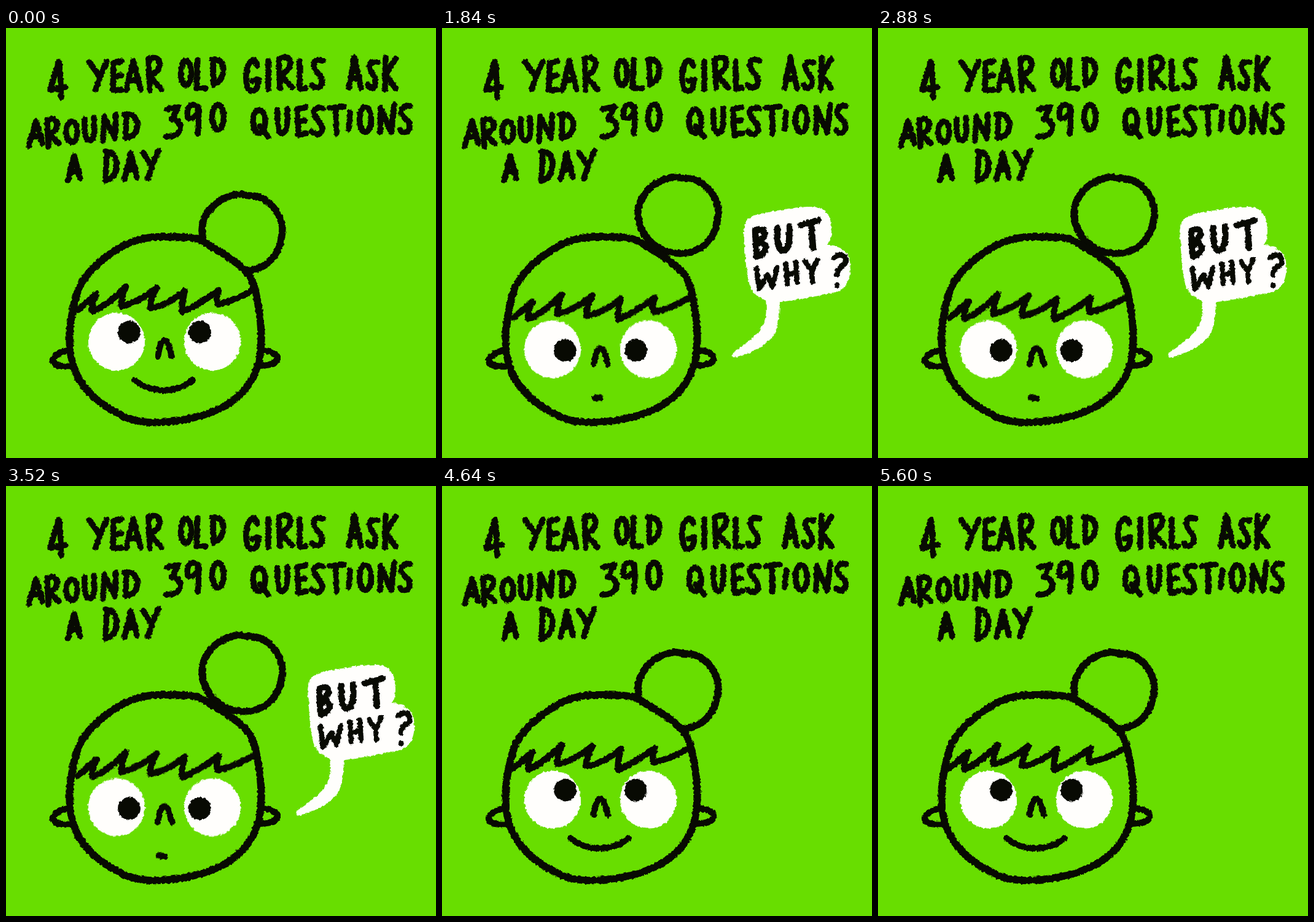
Recreate the animation shown at these times as an HTML page without scripts. Size 700 by 700 pixels, loop 5.68 s.

```html
<!DOCTYPE html>
<html lang="en">
<head>
<meta charset="utf-8">
<title>390 questions a day</title>
<style>
  html, body { margin: 0; width: 100%; height: 100%; overflow: hidden; background: #68de00; }
  svg { display: block; width: 100%; height: 100%; }
  .ink { fill: none; stroke: #080a03; stroke-linecap: round; stroke-linejoin: round; }
  .paper { fill: #fffefc; }
  .dot { fill: #080a03; }
  .skin { fill: #68de00; }

  .face, .bun, .pupils, .smile, .pout, .grow, .pop, .words, .tail {
    animation: 5680ms ease-in-out infinite;
  }
  .face { animation-name: face; }
  .bun { animation-name: bun; }
  .pupils { animation-name: pupils; }
  .smile { animation-name: smile; animation-timing-function: step-end; }
  .pout { animation-name: pout; animation-timing-function: step-end; }
  .grow { animation-name: grow; transform-origin: 477px 529.5px; }
  .pop { animation-name: pop; transform-origin: 577px 366px; }
  .words { animation-name: words; transform-origin: 583px 368px; }
  .tail { animation-name: tail; transform-origin: 535px 442px; }

  @keyframes face {
    0%, 10%, 78.87%, 100% { transform: none; }
    15.5%, 71.13% { transform: translateY(12.5px); }
  }
  @keyframes bun {
    0%, 11.27%, 79.5%, 100% { transform: translateY(28px); }
    16.5%, 73.3% { transform: none; }
  }
  @keyframes pupils {
    0%, 11.27%, 73.24%, 100% { transform: none; }
    15.5%, 70.42% { transform: translateY(17.5px); }
  }
  @keyframes smile {
    0%, 71.83% { opacity: 1; }
    12.68% { opacity: 0; }
  }
  @keyframes pout {
    0%, 71.83% { opacity: 0; }
    12.68% { opacity: 1; }
  }
  @keyframes grow {
    0%, 15.49% { transform: scale(0); animation-timing-function: linear; }
    16.9% { transform: scale(.16); }
    22.54% { transform: scale(1.06); }
    26.76%, 77.4% { transform: none; }
    77.46%, 100% { transform: scale(0); }
  }
  @keyframes pop {
    0%, 69.01% { transform: none; }
    73.24% { transform: scale(1.08); }
    77.46%, 100% { transform: scale(0); }
  }
  @keyframes words {
    0%, 69.01% { transform: none; }
    73.24%, 100% { transform: scale(1.065); }
  }
  @keyframes tail {
    0%, 69.01% { transform: none; }
    73.24% { transform: scale(.14); }
    74.65%, 100% { transform: scale(0); }
  }
</style>
</head>
<body>
<svg viewBox="0 0 700 700" role="img" aria-label="4 year old girls ask around 390 questions a day. But why?">
  <!-- Rough, boiling brush edge; opaque noise keeps the displacement centred -->
  <filter id="brush" filterUnits="userSpaceOnUse" x="0" y="0" width="700" height="700" color-interpolation-filters="sRGB">
    <feTurbulence type="fractalNoise" baseFrequency=".22" numOctaves="2" seed="1">
      <animate attributeName="seed" values="1;2;3;4" dur="320ms" calcMode="discrete" repeatCount="indefinite"/>
    </feTurbulence>
    <feColorMatrix values="1 0 0 0 0  0 1 0 0 0  0 0 1 0 0  0 0 0 0 1" result="noise"/>
    <feDisplacementMap in="SourceGraphic" in2="noise" scale="5" xChannelSelector="R" yChannelSelector="G"/>
  </filter>

  <rect class="skin" width="700" height="700"/>

  <g filter="url(#brush)">
    <g class="ink" stroke-width="9.5">
      <!-- 4 YEAR OLD -->
      <path d="M86 55L72 101L97 96M86 55C90 75 88 95 90 113"/>
      <path d="M135 55L151 77M164 55Q152 80 146 100M188 54L175 57L174 101L188 101M175 79L187 77"/>
      <path d="M196 101L207 53L219 100M200 86L215 84M234 101L232 50Q248 45 250 57Q250 72 234 78L253 100"/>
      <ellipse cx="293" cy="73" rx="8.5" ry="20"/>
      <path d="M312 52L310 98L325 98M337 51L338 92Q354 85 354 66Q352 50 335 51"/>
      <!-- GIRLS ASK -->
      <path d="M409 61Q406 50 399 54C388 62 388 100 399 103Q410 102 411 84L401 86M427 54V100"/>
      <path d="M446 98L444 51Q460 43 463 55Q462 70 447 76L466 97M478 54V99L488 98"/>
      <path d="M517 53Q503 48 501 60Q503 70 511 77Q518 90 510 96Q502 99 498 93"/>
      <path d="M558 98L567 48L578 98M561 83L575 81"/>
      <path d="M605 56Q592 53 591 63Q595 73 601 81Q605 93 596 98Q590 97 589 92M618 48L617 100M634 50L618 76L634 98"/>
      <!-- AROUND 390 -->
      <path d="M37 192L49 151L59 188M42 178L56 175M69 193L67 150Q82 145 84 157Q83 168 70 173L86 188"/>
      <ellipse cx="107" cy="169" rx="9" ry="17"/>
      <path d="M128 148C127 175 130 184 138 183C146 180 144 160 143 146M158 184L160 144L177 179L179 141"/>
      <path d="M196 141L195 179Q214 175 214 156Q210 138 192 141"/>
      <path d="M262 132L281 128L270 148Q285 150 284 164Q280 177 261 177"/>
      <path d="M313 132Q308 122 300 126Q293 134 296 146Q304 150 313 138V128Q315 155 312 172"/>
      <ellipse cx="345" cy="145" rx="9.5" ry="20.5"/>
      <!-- QUESTIONS -->
      <ellipse cx="412" cy="152" rx="10" ry="19"/>
      <path d="M413 160L427 177M442 134C441 160 444 174 451 171C459 166 458 150 458 131"/>
      <path d="M488 129L474 132L476 174L489 171M475 152L487 150"/>
      <path d="M516 131Q502 127 501 139Q505 149 512 155Q518 168 509 173Q501 173 498 168"/>
      <path d="M527 130L550 128M537 130L538 172M560 137L558 165"/>
      <ellipse cx="585" cy="149" rx="9.5" ry="20.5"/>
      <path d="M609 170L610 130L627 170L632 125M658 127Q644 124 643 138Q648 147 655 152Q660 165 652 170Q645 172 642 166"/>
      <!-- A DAY -->
      <path d="M101 248L111 208L121 245M105 235L119 232M164 202L162 249Q181 243 180 219Q176 200 162 201"/>
      <path d="M193 246L203 204L213 243M196 231L211 229M223 203L234 220M248 200Q238 222 231 245"/>
    </g>

    <path class="ink bun" stroke-width="11.5" d="M319 300C320 278 338 250 375 243C385 241 390 246 400 245C425 246 448 272 450 298C449 335 430 366 388 367C350 366 320 340 319 300Z"/>
    <path class="ink" stroke-width="10.5" d="M106 524C90 526 78 533 76 541C77 552 95 551 108 551M414 524C430 525 443 530 442 539C439 550 420 549 410 550"/>
    <path class="ink" stroke-width="12" style="fill:#68de00" d="M247 340C225 341 208 345 190 355C165 369 138 390 123 415C113 432 108 460 104 488C102 515 105 545 117 568C132 595 157 615 185 629C205 640 230 643 250 642C290 640 325 632 355 616C385 598 402 578 411 545C417 520 417 495 412 460C408 435 405 418 396 403C380 382 350 365 318 346C300 339 270 340 247 340Z"/>

    <g class="face">
      <path class="ink" stroke-width="10.5" d="M117 459L147 433Q137 455 141 461Q165 452 195 421Q186 446 188 453Q215 447 245 423Q233 446 235 456Q262 452 291 428Q285 452 287 462Q315 450 346 427Q341 442 345 450Q370 445 400 428"/>
      <ellipse class="paper" cx="180" cy="510.5" rx="46" ry="47"/>
      <ellipse class="paper" cx="336" cy="510.5" rx="46" ry="47"/>
      <g class="dot pupils">
        <circle cx="200.5" cy="495" r="18.5"/>
        <circle cx="315.5" cy="495" r="18.5"/>
      </g>
      <path class="ink" stroke-width="10" d="M247 535C249 524 252 509 258 509C264 509 267 524 270 535"/>
      <path class="ink smile" stroke-width="10" d="M209 573Q228 589 255 590Q283 590 304 573"/>
      <path class="ink pout" stroke-width="10.5" d="M249 589.5L258 590"/>
    </g>
  </g>

  <g class="grow"><g class="pop"><g filter="url(#brush)">
    <path class="paper tail" d="M527 443C530 470 525 488 508 502C495 514 480 523 473 530Q470 537 480 536C500 530 525 520 540 500C548 487 550 465 550 442Z"/>
    <path class="paper" d="M492 345C488 318 498 306 515 303C550 296 580 290 605 291C628 293 634 310 634 330C634 342 632 347 628 353C650 354 662 366 664 380C667 405 660 425 640 430C610 437 580 442 552 446C530 449 508 438 501 420C494 395 494 370 492 345Z"/>
    <g class="ink words" stroke-width="10.5">
      <path d="M510 330L512 372M510 330Q524 325 525 334Q524 344 512 350Q527 349 527 358Q524 369 512 372"/>
      <path d="M546 325C545 350 548 363 556 362C566 360 566 340 565 323M584 321L613 313M601 318L604 358"/>
      <path stroke-width="8.5" d="M512 391L516 425L530 402L538 421L545 390M560 384L562 417M576 381L578 414M561 402L577 398M591 380L601 395M611 377L602 395L603 413"/>
      <path stroke-width="8.5" d="M638 374Q648 366 656 373Q660 384 650 389Q643 394 643 402M643 419V420"/>
    </g>
  </g></g></g>
</svg>
</body>
</html>
```
